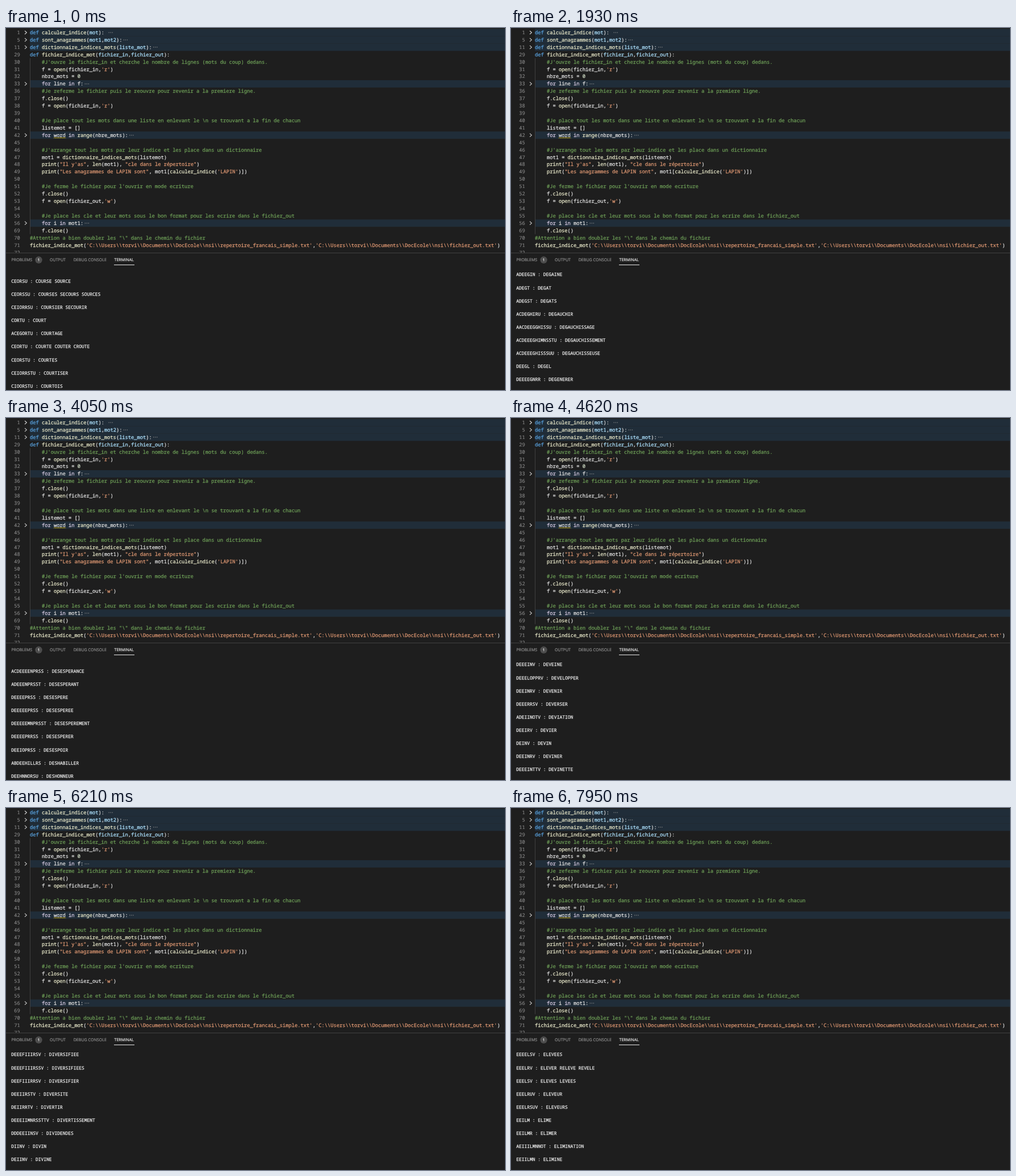
Animation, 878 px wide and 638 px high, one loop 8 s. Source, as an HTML page with a canvas:

```html
<!DOCTYPE html>
<html lang="fr">
<head>
<meta charset="utf-8">
<title>Anagrammes</title>
<style>
  html, body { margin: 0; width: 100%; height: 100%; overflow: hidden; background: #1e1e1e; }
  canvas { display: block; }
</style>
</head>
<body>
<canvas id="stage" width="878" height="638"></canvas>
<script>
const ctx = document.getElementById('stage').getContext('2d');
const MONO = '"Noto Sans Mono", "DejaVu Sans Mono", monospace';
const SANS = '"Open Sans", "Noto Sans", sans-serif';
const BG = '#1e1e1e', PLAIN = '#dcdcdc';
const CODE_X = 42, CODE_W = 5.238, CODE_H = 12.92;
const TERM_X = 9.2, TERM_W = 4.77, TERM_H = 11.55, TERM_ROWS = 18;
const LOOP = 8000;

// Line number, ">" for a folded block, then the code
const source = String.raw`1>def calculer_indice(mot): 
5>def sont_anagrammes(mot1,mot2):
11>def dictionnaire_indices_mots(liste_mot):
29 def fichier_indice_mot(fichier_in,fichier_out):
30     #J'ouvre le fichier_in et cherche le nombre de lignes (mots du coup) dedans.
31     f = open(fichier_in,'r')
32     nbre_mots = 0
33>    for line in f:
36     #Je referme le fichier puis le reouvre pour revenir a la premiere ligne.
37     f.close()
38     f = open(fichier_in,'r')
39 
40     #Je place tout les mots dans une liste en enlevant le \n se trouvant a la fin de chacun
41     listemot = []
42>    for word in range(nbre_mots):
45 
46     #J'arrange tout les mots par leur indice et les place dans un dictionnaire
47     mot1 = dictionnaire_indices_mots(listemot)
48     print("Il y'as", len(mot1), "cle dans le répertoire")
49     print("Les anagrammes de LAPIN sont", mot1[calculer_indice('LAPIN')])
50 
51     #Je ferme le fichier pour l'ouvrir en mode ecriture
52     f.close()
53     f = open(fichier_out,'w')
54 
55     #Je place les cle et leur mots sous le bon format pour les ecrire dans le fichier_out
56>    for i in mot1:
69     f.close()
70 #Attention a bien doubler les "\" dans le chemin du fichier
71 fichier_indice_mot('C:\\Users\\torvi\\Documents\\DocEcole\\nsi\\repertoire_francais_simple.txt','C:\\Users\\torvi\\Documents\\DocEcole\\nsi\\fichier_out.txt')
72 `.split('\n');

// STEM:ending,ending gives one entry per ending; "+" joins anagrams
const lexicon = `
COURS:E+SOURCE,ES+SECOURS+SOURCES,IER+SECOURIR COURT:,AGE,E+COUTER+CROUTE,ES,ISER,OIS,OISE,OISIE
COUSIN:,E,S COUSSIN:,ET COUT:,ANT,EAU,EAUX,ELLERIE,EUSE,EUX,S COUTUM:E,ES,IER,IERE COUTUR:E,ES,IER,IERE,IERS
COUV:ENT,ENTS,ER,ERCLE,ERT,ERTE,ERTS,ERTURE,EUSE,RIR CRABE:,S CRACH:AT,EMENT,ER,OIR CRAIE
CRAIN:DRE,T,TE,TES,TIF,TIVE CRAMOISI CRAMP:E,ON,ONNER CRAN:,E,ES CRAPAUD:,S CRAQU:ANT,EMENT,ER
CRASS:E,EUX CRATERE CRAVACHE CRAVATE:,S CRAYON:,NAGE,NER,S CREAN:CE,CIER CREAT:EUR,ION,IONS,RICE,URE
CRECHE CREDI:BLE,T,TER,TEUR,TS CREDUL:E,ITE CRE:ER,MATION,ME,MERIE,MEUX,NEAU,NELER,PE,PITER,PU,PUSCULE
CRESSON CREUS:EMENT,ER,ET CREUX CREV:AISSE,ASSE,ER,ETTE
CRI:,ANT,ARD,BLE,BLER,ER,ME,MES,MINALITE,MINEL,NIERE,QUET,SE,SPATION,SPER,STAL,STALLIN,TERE,TIQUE,TIQUER
CROC:,HET,HETER,HU,ODILE CROI:RE,SADE,SEE,SEMENT,SER,SIERE,SSANCE,SSANT,TRE,X CROQU:ANT,ER,ETTE,IS
CROSSE CROUL:ANT,ER CROUPE CROUTON CROY:ABLE,ANCE,ANT CRU:,AUTE,CHE,DITE,EL,ELLE,STACE CRYPTE
CUB:E,IQUE,ISME CUEIL:LETTE,LIR CUILL:ERE,ERON CUI:R,RASSE,RE,SINE,SINER,SINIER,SSE,SSON,VRE
CUL:BUTE,MINANT,MINER,OTTE,PABILITE,PABLE,TE,TIVATEUR,TIVER,TURE,TUREL CUMUL:,ER CUPID:E,ITE
CUR:ABLE,ATIF,E,IEUX,IOSITE CUTANE CUVE:,TTE CYCL:E,ISTE,ONE CYGNE CYLIND:RE,RIQUE CYN:IQUE,ISME CYPRES
DACTYLO DAIGNER DAIM DALL:AGE,E DAM:E,IER,NATION,NER DANDY DANGER:,EUX,S DANS:,E,ER,EUR,EUSE DARD:,ER
DAT:E,ER,IF,TE DAUPHIN DE:,AMBULER,BACLE,BALLAGE,BALLER,BANDADE,BARQUER,BARRAS,BAT,BATTRE,BAUCHE,BILE,BIT
DEB:ITER,LAYER,OIRE,ORDER,OUCHER,OURSER,OUT,RIS,UT,UTANT DEC:ADENCE,ALAGE,APITER,EDER,EMBRE,ENCE,EPTION
DEC:ERNER,ES,EVOIR,HARGE,HET,HIFFRER,HIRER,IDER,IMAL,ISION,LARER,LIN,OR,OUPER,OUVRIR,RET,RIRE
DED:AIN,IER,UIRE DEESSE DEF:AIRE,AUT,ENDRE,I,ICIT,ILER,INIR,ORMER,UNT
DEG:AINE,AT,ATS,AUCHIR,AUCHISSAGE,AUCHISSEMENT,AUCHISSEUSE,EL,ENERER,OURDIR,OUT,OUTER,RADATION,RADER
DEG:RAFER,RAISSER,RE,RES,REVER,RINGOLER,UERPIR,UISEMENT,UISER,USTATION,USTER DEHORS DEJA DEJEUNER
DEL:ABRER,AI,AIS,AISSER,ASSER,ATION,AVER,AYER,ECTABLE,ECTER,EGATION,EGUE,EGUER,IBERE,IBERER,ICAT,ICE,ICIEUX
DEL:IER,IMITER,IRE,IT,IVRANCE,IVRER,OGER,OYAL,TA,UGE DEM:AGOGIE,AIN,ANDE,ANDER,ANGER,ARCHE,ARRAGE,ARRER
DEM:ASQUER,ELER,EMBRER,ENAGER,ENCE,ENTIR,ESURE,EURE,I,ISSION,OCRATE,OCRATIE,ODER,OGRAPHIE,OLIR,OLITION,ON
DEM:ONTER,ONTRER DEN:ATURER,EIGER,I,IER,IGRER,IVELE,OMBRER,OMMER,ONCER,OTER,OUER,SE,SITE,T,TAIRE,TELLE,TIER
DEN:TISTE,TS,UEMENT DEONTOLOGIE DEPANN:AGE,ER,EUR DEPART:,EMENT,EMENTAL
DEP:ASSER,ECE,ECER,ECHE,ECHER,EINDRE,ENDANCE,ENDANT,ENDRE,ENSE,ENSER,ENSIER,ERIR,EUPLER,ISTER,IT,LACEMENT
DEP:LACER,LAIRE,LAISIR,LIANT,LIER,LOIEMENT,LORABLE,LORER,LOYER,ORTER,OSER,OSITAIRE,OT,OTOIR,OUILLE,OURVU
DEP:RAVER,RECIER,RESSION,RIMER,UTATION,UTE DER:ACINER,AILLER,AISON,ANGER,APAGE,APER,EGLER,IDER,ISION,ISOIRE
DER:IVE,IVER,MATOLOGIE,NIER,NIERE,OBER,OGATION,OGER,OULER,OUTE,RIERE DES:,ABUSER,ACCORD,AGREABLE,AGREGER
DES:ALTERER,ARMER,ARROI,ASTRE,AVANTAGE,AVEU,AVOUER,CENDANT,CENDRE,CENTE,CRIPTIF,EMPARE,ENCHANTER,EQUILIBRE
DES:ERT,ERTER,ERTEUR,ERTION DESESP:ERANCE,ERANT,ERE,EREE,EREMENT,ERER,OIR DES:HABILLER,HONNEUR,HONORER,IGNER
DES:INENCE,INFECTER,IR,IRABLE,IRER,IREUX,ISTER,OBEIR,OEUVRE,OLANT,OLER,ORDRE,ORMAIS
DESS:ECHER,EIN,ERRER,ERT,ERVIR,IN,INER,OUS,US DEST:IN,INATION,INEE,INER,ITUER,RUCTEUR,RUCTION
DET:ACHER,AIL,AILLER,ALER,ECTER,ECTIVE,EINDRE,ENDRE,ENIR,ENTE,ENTION,ERGENT,ERIORER,ERMINANT,ERMINER,ERRER
DET:ESTABLE,ESTER,ONATION,ONNER,OUR,OURNER,RACTEUR,RESSE,RIMENT,ROMPER,RONER,RUIRE,TE DEUIL DEUX:,IEME
DEV:ALER,ALISER,ANCER,ANT,ANTURE,ASTER,EINE,ELOPPER,ENIR,ERSER,IATION,IER,IN,INER,INETTE,IS,ISE,ISER,OILER
DEV:OIR,ORER,OT,OTION,OUER DEXTERITE DIA:BETE,BLE,BLERIE,DEME,GNOSTIC,GONALE,LECTE,LOGUE,LOGUER,MANT,METRE
DIA:PASON,PHRAGME DICT:ATEUR,ATURE,EE,ER,ION,IONNAIRE DI:ESE,ETE,EU,FFAMER,FFERENCE,FFERENT,FFERER,FFICILE
DI:FFICULTE,FFORME,FFUS,FFUSER,GERER,GESTE,GESTIF,GITAL,GNE,GNITE,GUE,LATER,LEMME,LIGENCE,LUER,MANCHE
DI:MENSION,MINUER,NDE,NER,OCESE,PLOMATE,PLOME,RE,RECT,RECTEUR,RECTION,RIGEANT,RIGER
DISC:ERNER,IPLE,IPLINE,O,ORDE,OURIR,OURS,REDIT,RET,RETION,RIMINER,ULPER,URSIF,USSION,USSIONS
DISCUT:ABLE,E,EE,ENT,ER,ONS DIS:ERT,ETTE,EUR,GRACE,JOINDRE,LOQUER,PARAITRE,PARATE,PARITE,PARITION,PARU
DIS:PENSAIRE,PENSE,PENSER,PERSER,PERSION,PONIBLE,POS,POSER,POSITIF,POSITION,PUTE,PUTER,QUE,QUES,SECTION
DIS:SEMBLABLE,SEMINER,SENTIMENT,SERTATION,SIDENT,SIMULER,SIPER,SOCIER,SOLUTION,SOLVANT,SONANCE,SOUDRE,SUADER
DIST:ANCE,ANCER,ANT,ENDRE,ILLER,INCT,INCTION,INGUER,RACTION,RAIRE,RAIT,RIBUER,RICT DIT:,E,ES,S DIURNE
DIV:A,AGUER,AN,ERGENCE,ERGENT,ERGER,ERS,ERSE,ERSEMENT,ERSIFIE,ERSIFIEE,ERSIFIEES,ERSIFIER,ERSITE,ERTIR
DIV:ERTISSEMENT,IDENDES,IN,INE,INITE,ISER,ISEUR,ISIBLE,ISION,ORCE,ORCER,ULGUER DIX:,IEME DIZAINE
DOC:ILE,ILITE,K,TE,TEUR,TORAT,TRINE,UMENT,UMENTER DOGM:ATIQUE,E DOIGT:,E,S DOL:EANCE,ENT
DOM:AINE,E,ESTIQUE,ICILE,INANT,INATION,INER,INO,MAGE,PTER,PTEUR DON:,ATEUR,C,JON,NE,NEE,NER,NEUR
DOR:E,ENAVANT,ER,LOTER,MANT,MEUR,MIR,SAL,TOIR,URE DOS:,AGE,E,ER,SIER DOT:,ER DOUAN:E,IER DOUBL:E,ER,URE
DOUC:E,EMENT,EUR,HE,HER DOU:E,ER,ILLE,LEUR,LOUREUX,TE,TER,TEUX,VE,X,ZAINE,ZE,ZIEME DOYEN DRAG:EE,ON,UE,UER
DRAIN:,AGE,ER DRAM:ATIQUE,ATURGE,E DRAP:,EAU,ER,ERIE DRESS:AGE,ER,EUR DRO:GUE,IT,ITE,ITIER,LE,LERIE,MADAIRE
DRU:,IDE DU:,BITATIF,C,CHESSE,EL,NE,O,PE,PER,PERIE,PLEX,PLICATA,R,RABLE,RANT,RCIR,REE,REMENT,RER,RETE,VET
DYNAM:IQUE,ISME,ITE,O DYNASTIE EAU:,X EB:AHI,AUCHE,AUCHER,ENE,ENISTE,LOUIR,OULER,RANLER,RECHER,RIETE,ULLITION
EC:AILLE,ARLATE,ART,ARTER,ERVELE,HAFAUD,HANGE,HANGER,HANTILLON,HAPPER,HARPE,HEC,HELLE,HELON,HINE,HO,HOUER
EC:LAIR,LAIRAGE,LAIRER,LAT,LATER,LIPSE,LORE,LUSE,OLE,OLIER,OLOGIE,ONOME,ONOMIE,ORCE,ORCHER,OULER,OUTE,OUTER
EC:RAN,RASER,RIN,RIRE,RITEAU,RITURE,ROU,ROULER,UEIL,UME,UREUIL,URIE EDI:FICE,FIER,T,TER,TEUR,TION
EDUCATION EDUQUER EFF:ACER,ARER,ECTIF,ECTUER,ET,ICACE,IGIE,LEURER,ONDRER,ORT,RAYER,ROI,RONTE,USION
EG:AL,ALER,ALITE,ARD,ARER,AYER,LISE,OISTE,ORGER,OUT EJECTER EL:ABORER,AN,ANCER,ARGIR,ASTIQUE,ECTEUR
EL:ECTION,ECTRICITE,EGANCE,EGANT,EMENT,EPHANT ELEV:AGE,E,EE,EES,ER+RELEVE+REVELE,ES+LEVEES,EUR,EURS
ELIM:E,ER,INATION,INE`;

const words = lexicon.trim().split(/\s+/).flatMap(entry => {
  const [stem, ends = ''] = entry.split(':');
  return ends.split(',').map(end => (stem + end).split('+'));
});

// Bursts of output: first update, last update, count
const ticks = [
  [50, 850, 17], [890, 1660, 17], [1720, 1930, 5], [2010, 2040, 2], [2180, 2980, 17], [3070, 3860, 18],
  [3910, 4670, 17], [4720, 5480, 17], [5530, 6000, 9], [6140, 6210, 3], [6250, 6920, 16], [6970, 7760, 18],
  [7810, 7950, 4]
].flatMap(([from, to, n]) =>
  Array.from({ length: n }, (_, i) => Math.floor((from + (to - from) * i / (n - 1)) / 10) * 10));

// Update count, last printed word, 1 if its blank line is printed too
const marks = [
  [0, 'COURTOIS', 0], [39, 'DEGENERER', 1], [58, 'DEPARTEMENTAL', 0], [80, 'DESHONNEUR', 0],
  [105, 'DISCUTENT', 1], [122, 'DIVINE', 1], [160, 'ELIMINE', 1]
].map(([step, word, blank]) => [step, 2 * words.findIndex(w => w[0] === word) + blank]);

function lastRow(step) {
  const i = Math.max(1, marks.findIndex(m => m[0] >= step));
  const [s0, r0] = marks[i - 1], [s1, r1] = marks[i];
  return Math.round(r0 + (r1 - r0) * (step - s0) / (s1 - s0));
}

// A hairline outline gives small type a fuller weight
function text(str, x, y, color, weight = 0.3) {
  ctx.fillStyle = ctx.strokeStyle = color;
  ctx.lineWidth = weight;
  ctx.fillText(str, x, y);
  ctx.strokeText(str, x, y);
}

function box(x, y, w, h, color) {
  ctx.fillStyle = color;
  ctx.fillRect(x, y, w, h);
}

function stroke(points, color, width) {
  ctx.strokeStyle = color;
  ctx.lineWidth = width;
  ctx.beginPath();
  points.forEach(([x, y]) => ctx.lineTo(x, y));
  ctx.stroke();
}

function dot(x, y, r, color) {
  ctx.fillStyle = color;
  ctx.beginPath();
  ctx.arc(x, y, r, 0, 7);
  ctx.fill();
}

const TOKEN = /(#.*)|('[^']*'|"[^"]*")|\b(def)\b|\b(for|in)\b|\b(\w+)(?=\()|\b(\d+)\b|\w+|\W/g;
const COLORS = ['#6a9955', '#d7936f', '#569cd6', '#d2c6de', '#e2e2c4', '#d0dcc6'];

function codeLine(code, y) {
  for (const m of code.matchAll(TOKEN)) {
    const kind = m.slice(1).findIndex(Boolean);
    const param = code.startsWith('def') && /\w/.test(m[0]);
    const color = COLORS[kind] || (param ? '#a9dcf8' : PLAIN);
    text(m[0], CODE_X + m.index * CODE_W, y, color);
  }
}

function drawEditor() {
  ctx.save();
  ctx.beginPath();
  ctx.rect(0, 0, 878, 396);
  ctx.clip();
  ctx.font = `${CODE_W / 0.6}px ${MONO}`;
  source.forEach((line, i) => {
    const [, num, mark, code] = line.match(/^(\d+)(.)(.*)$/);
    const mid = 8 + i * CODE_H, base = mid + 2.9;
    if (mark === '>') {
      box(CODE_X, mid - CODE_H / 2, 878, CODE_H, '#202d39');
      stroke([[33, mid - 3], [36.4, mid], [33, mid + 3]], '#d0d0d0', 1.1);
      const end = CODE_X + code.length * CODE_W;
      for (const dx of [3, 6, 9]) dot(end + dx, mid, 0.75, '#8a8a8a');
    }
    text(num, 24.7 - num.length * CODE_W, base, '#858585', 0.15);
    codeLine(code, base);
  });
  box(42, 53.2, 1, 310.2, '#404040');
  const wave = Array.from({ length: 15 }, (_, i) => [84 + i * 1.5, 194.4 - (i % 2) * 1.5]);
  stroke(wave, '#d6b000', 1);
  ctx.restore();
}

function drawTabs() {
  box(0, 396, 878, 1, '#414141');
  ctx.font = `7.1px ${SANS}`;
  text('PROBLEMS', 9.5, 411.4, '#979797', 0.15);
  text('OUTPUT', 77, 411.4, '#979797', 0.15);
  text('DEBUG CONSOLE', 118.7, 411.4, '#979797', 0.15);
  text('TERMINAL', 190.5, 411.4, '#e7e7e7', 0.2);
  box(190, 417, 36, 1, '#e7e7e7');
  dot(57.5, 408.8, 6.2, '#4d4d4d');
  ctx.font = `6.5px ${SANS}`;
  text('1', 55.7, 411.2, '#ffffff', 0.2);
}

function drawTerminal(step) {
  box(0, 424, 878, 214, BG);
  ctx.font = `${TERM_W / 0.6}px ${MONO}`;
  const first = lastRow(step) - TERM_ROWS + 1;
  for (let r = 0; r < TERM_ROWS; r++) {
    const group = words[(first + r) / 2];
    if (!group) continue;
    const key = [...group[0]].sort().join('');
    text(`${key} : ${group.join(' ')}`, TERM_X, 437.4 + r * TERM_H, '#e6e6e6');
  }
}

ctx.textRendering = 'geometricPrecision';
ctx.lineJoin = 'round';
box(0, 0, 878, 638, BG);
drawEditor();
drawTabs();

let shown = -1;
function frame() {
  const t = performance.now() % LOOP;
  const step = ticks.filter(tick => tick <= t).length;
  if (step !== shown) drawTerminal(shown = step);
  requestAnimationFrame(frame);
}
frame();
</script>
</body>
</html>
```
